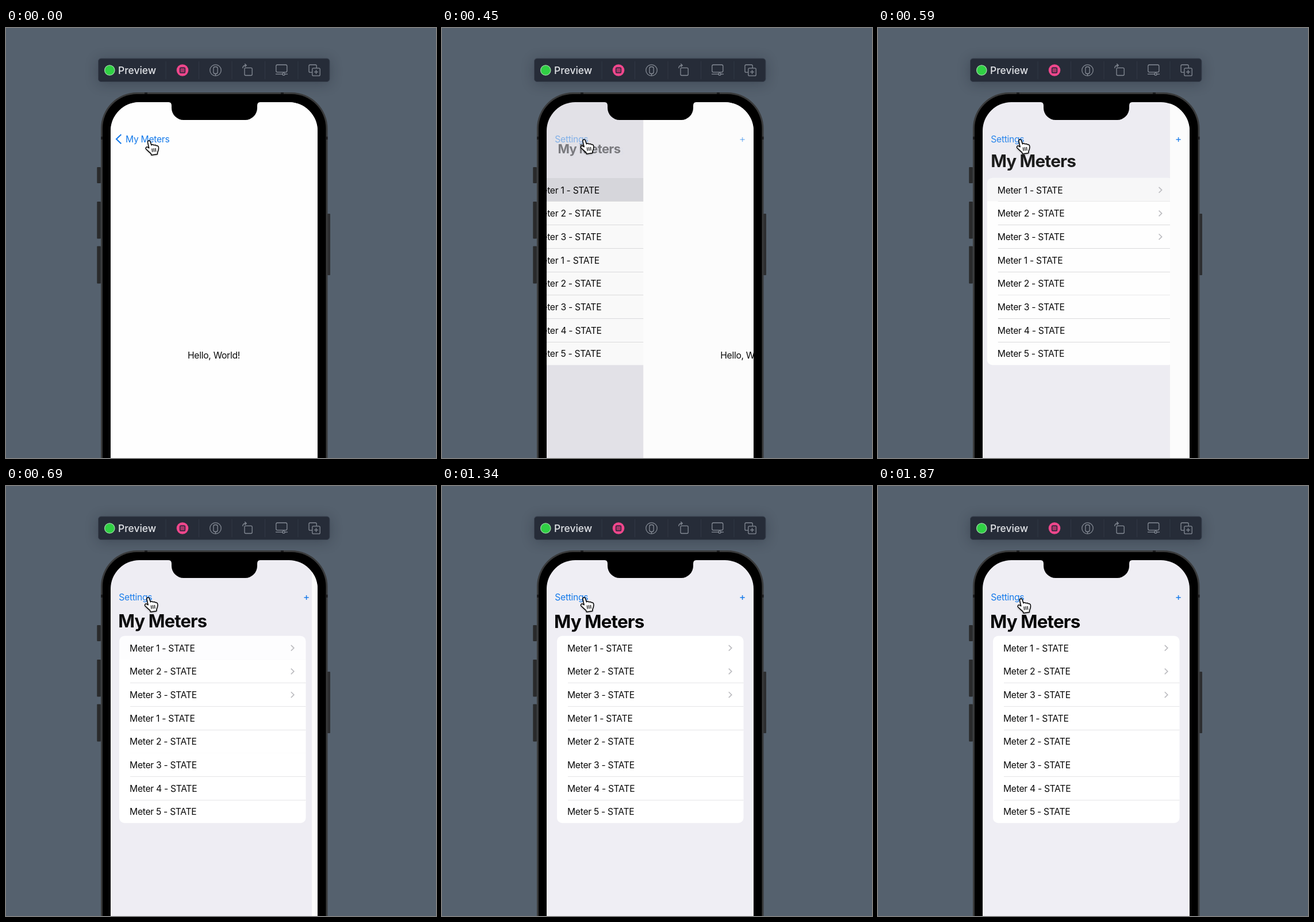
Animation of 748 by 748 pixels, one loop 2000 ms. Source, as an HTML page with a canvas:

```html
<!DOCTYPE html>
<html lang="en">
<head>
<meta charset="utf-8">
<title>Navigation preview</title>
<style>
  html, body { margin: 0; width: 100%; height: 100%; overflow: hidden; background: #55616e; }
  canvas { display: block; width: 748px; height: 748px; }
</style>
</head>
<body>
<canvas id="stage" width="748" height="748"></canvas>
<script>
const ctx = document.getElementById('stage').getContext('2d');
const LOOP = 2000;
const POP_START = 400;
const POP_DECAY = 81;
const SCREEN = { x: 182, y: 129, w: 360 };
const ROW = 40.68;
const LIST_TOP = 260.8;
const BLUE = '#157aea';
const rows = [1, 2, 3, 1, 2, 3, 4, 5].map(n => `Meter ${n} - STATE`);

const clamp = v => Math.min(1, Math.max(0, v));
const ramp = (t, a, b) => clamp((t - a) / (b - a));
const smooth = v => v * v * (3 - 2 * v);

function box(x, y, w, h, r, fill, stroke, width = 1) {
  ctx.beginPath();
  ctx.roundRect(x, y, w, h, r);
  if (fill) { ctx.fillStyle = fill; ctx.fill(); }
  if (stroke) { ctx.strokeStyle = stroke; ctx.lineWidth = width; ctx.stroke(); }
}

function disc(x, y, r, fill, stroke, width = 1) {
  ctx.beginPath();
  ctx.arc(x, y, r, 0, Math.PI * 2);
  if (fill) { ctx.fillStyle = fill; ctx.fill(); }
  if (stroke) { ctx.strokeStyle = stroke; ctx.lineWidth = width; ctx.stroke(); }
}

function line(points, color, width) {
  ctx.beginPath();
  points.forEach(([x, y]) => ctx.lineTo(x, y));
  ctx.strokeStyle = color;
  ctx.lineWidth = width;
  ctx.stroke();
}

function text(str, x, y, color, size = 15.7, weight = 400, spacing = -0.3) {
  ctx.font = `${weight} ${size}px Inter, sans-serif`;
  ctx.letterSpacing = `${spacing}px`;
  ctx.fillStyle = color;
  ctx.fillText(str, x, y);
}

function faded(alpha, draw) {
  if (alpha <= 0) return;
  ctx.save();
  ctx.globalAlpha = alpha;
  draw();
  ctx.restore();
}

function toolbar() {
  ctx.save();
  ctx.shadowColor = 'rgba(20,26,36,0.32)';
  ctx.shadowBlur = 22;
  ctx.shadowOffsetY = 3;
  box(160.5, 53, 402.5, 40.5, 5, '#262c38');
  ctx.restore();
  box(160.5, 53, 402.5, 40.5, 5, null, '#3a4350', 1);
  for (let i = 0; i < 5; i++) {
    const x = 278 + i * 57.5;
    line([[x, 58], [x, 89]], '#313845', 1);
  }

  disc(180.3, 73.5, 8.7, '#30d044', '#9bd6a4', 1.3);
  text('Preview', 195, 79.6, '#e3e5e9', 17.4, 500, 0);

  disc(307, 73.5, 10.3, '#ef478c');
  box(302.6, 69.1, 8.8, 8.8, 2, '#a43769', '#3a2740', 1.7);

  const gray = '#858b95', w = 1.3;
  disc(364.5, 73.5, 9.7, null, gray, w);
  box(360.9, 67.5, 7.2, 12, 2.8, null, gray, w);
  line([[364.5, 79.5], [364.5, 83]], gray, w);

  box(415, 69.3, 13.2, 13.2, 2, null, gray, w);
  ctx.beginPath();
  ctx.moveTo(411.8, 70);
  ctx.quadraticCurveTo(411.8, 65, 417.5, 65);
  ctx.stroke();
  line([[415.3, 62.3], [418.2, 65], [415.3, 67.7]], gray, w);

  box(469.8, 64, 19, 12.8, 2.3, null, gray, w);
  line([[469, 80.2], [490, 80.2]], gray, w);
  disc(483, 80.2, 2, '#262c38', gray, w);

  box(527, 64, 13.2, 13.2, 2, null, gray, w);
  box(532.8, 69.8, 13.4, 13.4, 2, '#262c38', gray, w);
  line([[539.5, 73], [539.5, 80]], gray, w);
  line([[536, 76.5], [543, 76.5]], gray, w);
}

function phoneBody() {
  [[242, 28], [302, 64.5], [379.5, 65]].forEach(([y, h]) => box(158.3, y, 6.5, h, 1, '#292a2b'));
  box(559, 323, 5, 107, 1, '#2d2e30');
  box(165, 112, 394.5, 760, 63, '#393a3b');
  box(168, 115, 388.5, 760, 60, '#000');
  ctx.fillStyle = '#1c1c1d';
  ctx.fillRect(241, 112, 5, 3);
  ctx.fillRect(478, 112, 5, 3);
  ctx.fillRect(165, 189, 3, 5);
  ctx.fillRect(556.5, 189, 3, 5);
}

function notch() {
  const l = 288, r = 437, top = 129, bottom = 160;
  ctx.beginPath();
  ctx.moveTo(l - 5, top - 1);
  ctx.lineTo(l - 5, top);
  ctx.quadraticCurveTo(l, top, l, top + 6);
  ctx.arcTo(l, bottom, l + 20, bottom, 21);
  ctx.arcTo(r, bottom, r, bottom - 20, 21);
  ctx.lineTo(r, top + 6);
  ctx.quadraticCurveTo(r, top, r + 5, top);
  ctx.lineTo(r + 5, top - 1);
  ctx.fillStyle = '#000';
  ctx.fill();
}

// "rest" runs from 1 (detail page) to 0 (list page).
function listPage(rest) {
  ctx.fillStyle = '#efeef4';
  ctx.fillRect(SCREEN.x, SCREEN.y, SCREEN.w, 640);
  ctx.fillStyle = `rgba(0,0,0,${0.1 * rest})`;
  ctx.fillRect(SCREEN.x, SCREEN.y, SCREEN.w, 640);

  ctx.save();
  ctx.translate(-0.3 * SCREEN.w * rest, 0);
  const shade = Math.round(255 - 11 * rest);
  box(200, LIST_TOP, 324.5, ROW * rows.length, 9, `rgb(${shade},${shade},${shade})`);
  faded(Math.min(1, rest * 1.6), () => box(200, LIST_TOP, 324.5, ROW, [9, 9, 0, 0], '#d1d1d6'));

  rows.forEach((label, i) => {
    const top = LIST_TOP + i * ROW;
    text(label, 218, top + 26.7, '#080808');
    if (i < 3) {
      const y = top + 21;
      line([[498.8, y - 4.9], [503.8, y], [498.8, y + 4.9]], '#bdbdc1', 1.7);
    }
    if (i < rows.length - 1) {
      const faint = i === 0 || i === 4;
      faded(faint ? clamp(rest * 6) : 1, () => {
        ctx.fillStyle = rest > 0.03 ? '#dadadc' : '#e5e5e7';
        ctx.fillRect(219, Math.round(top + ROW), 305.5, 1);
      });
    }
  });
  ctx.restore();
}

function detailPage(rest) {
  const shift = SCREEN.w * (1 - rest);
  if (shift >= SCREEN.w) return;
  ctx.fillStyle = shift > 0 ? '#fcfcfc' : '#fefefe';
  ctx.fillRect(SCREEN.x + shift, SCREEN.y, SCREEN.w, 640);
  text('Hello, World!', 316 + shift, 575.4, '#080808');
}

function navBar(t, rest) {
  const press = 1 - 0.77 * ramp(t, 230, 370);
  const backAlpha = press * clamp(rest * 2 - 1);
  faded(backAlpha, () => {
    line([[200.3, 185.2], [192, 193.2], [200.3, 201.2]], BLUE, 2.1);
    ctx.translate(208 - 12 * (1 - rest), 198.7 + 48 * (1 - rest));
    const grow = 1 + 1.06 * (1 - rest);
    ctx.scale(grow, grow);
    text('My Meters', 0, 0, BLUE);
  });
  faded(1 - rest, () => {
    text('Settings', 196.3, 199, BLUE);
    line([[518.5, 194], [526.7, 194]], BLUE, 1.5);
    line([[522.6, 189.9], [522.6, 198.1]], BLUE, 1.5);
    ctx.translate(195 + 12 * rest, 247 - 54 * rest);
    const size = 1 - 0.57 * rest;
    ctx.scale(size, size);
    text('My Meters', 0, 0, '#050506', 31.4, 700, -0.85);
  });
}

function cursor(t) {
  const away = smooth(ramp(t, 20, 180)) - smooth(ramp(t, 1380, 1600));
  const hand = new Path2D(
    'M4.4 13.6 L2.2 4.2 C1.5 0.6 5.5 -0.6 6.6 2.6 L8.6 8.6 ' +
    'C10 7.2 12 7.4 12.8 8.8 C14.4 7.7 16 8.2 16.7 9.6 ' +
    'C18.8 8.9 20.6 10.2 20.9 12 C21.6 15.4 20.4 18.4 19 21.4 ' +
    'L19 24.2 L8.6 25.8 L7.8 23.2 C5.2 21.2 2.8 18.6 -0.4 15.8 ' +
    'C-2.6 13.8 -0.6 11.2 1.8 12 Z');
  ctx.save();
  ctx.translate(244.4 - 1.6 * away, 195.2 - 2 * away);
  ctx.save();
  ctx.shadowColor = 'rgba(0,0,0,0.4)';
  ctx.shadowBlur = 3;
  ctx.shadowOffsetY = 1.5;
  ctx.fillStyle = '#fff';
  ctx.fill(hand);
  ctx.restore();
  ctx.strokeStyle = '#000';
  ctx.lineWidth = 1.5;
  ctx.lineJoin = 'round';
  ctx.stroke(hand);
  for (let i = 0; i < 3; i++) {
    const x = 9.6 + i * 3;
    line([[x, 14.4 - i * 0.3], [x + 0.7, 20.6 - i * 0.3]], '#000', 1.3);
  }
  ctx.restore();
}

function draw(t) {
  const decay = t <= POP_START ? 1 : Math.exp((POP_START - t) / POP_DECAY);
  const rest = decay < 0.004 ? 0 : decay;

  ctx.fillStyle = '#55616e';
  ctx.fillRect(0, 0, 748, 748);
  toolbar();
  phoneBody();

  ctx.save();
  ctx.beginPath();
  ctx.roundRect(SCREEN.x, SCREEN.y, SCREEN.w, 740, 50);
  ctx.clip();
  listPage(rest);
  detailPage(rest);
  navBar(t, rest);
  ctx.restore();

  notch();
  cursor(t);
}

const start = performance.now();
function tick() {
  draw((performance.now() - start) % LOOP);
  requestAnimationFrame(tick);
}
tick();
</script>
</body>
</html>
```
